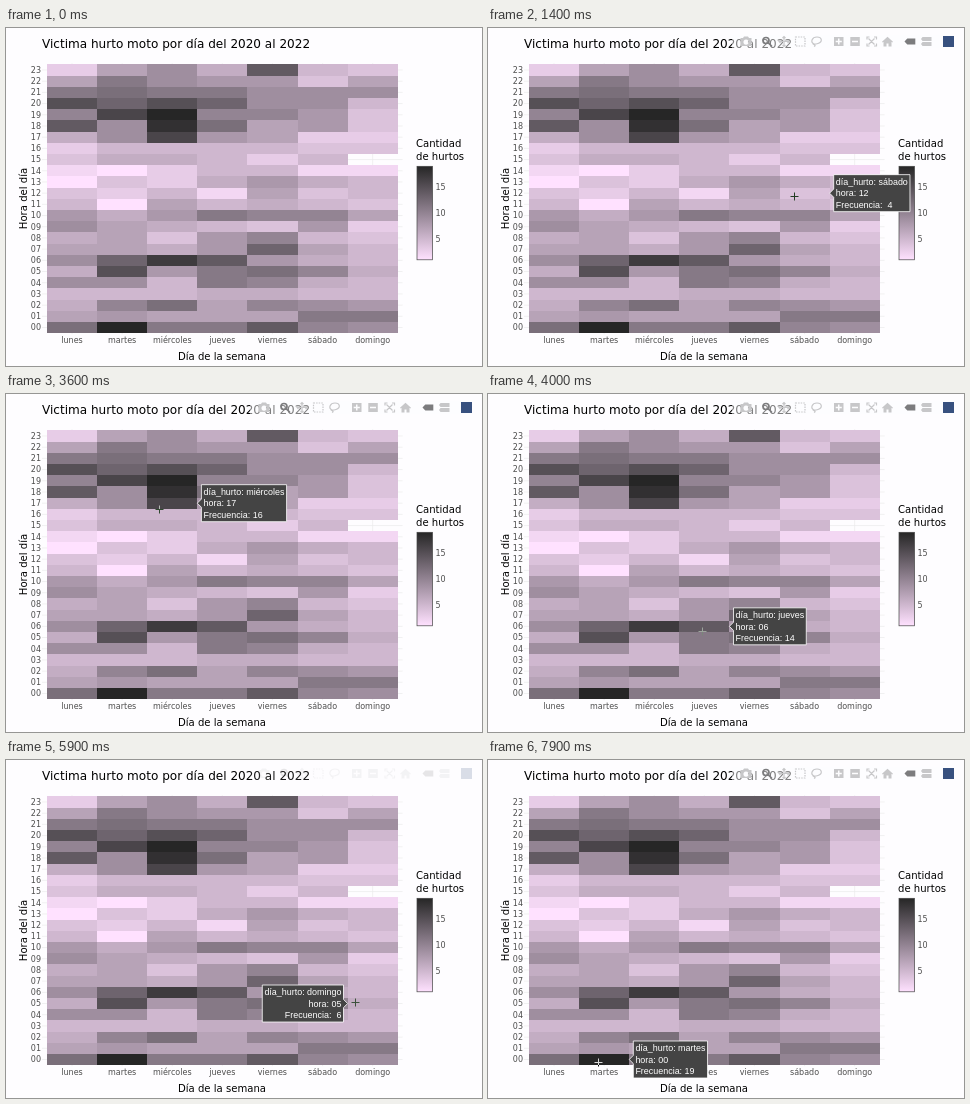
These frames come from a looping animation (476x338 px, 8 s). An HTML page:

```html
<!DOCTYPE html>
<html lang="es">
<head>
<meta charset="utf-8">
<style>
  html, body { margin: 0; width: 100%; height: 100%; overflow: hidden; background: #fefdff; }
  svg { display: block; }
  text { font-family: "DejaVu Sans", sans-serif; font-size: 10.08px; }
  .tick { font-size: 8px; fill: #4d4d4d; }
  .title { font-size: 12.05px; }
  #tip text { font-family: "Liberation Sans", Arial, sans-serif; font-size: 8.95px; fill: #fff; white-space: pre; }
  #cells { shape-rendering: crispEdges; }
  #cursor { mix-blend-mode: difference; stroke: #fff; fill: none; }
  #bar { fill: #c7c7c9; stroke: none; }
  #bar .line { fill: none; stroke: #c7c7c9; stroke-width: 1.2; }
  #bar .on { fill: #7c7c7e; }
  #bar .line.on { fill: none; stroke: #7c7c7e; stroke-width: 1.7; }
</style>
</head>
<body>
<svg width="476" height="338" viewBox="0 0 476 338">
  <defs>
    <linearGradient id="scale" x2="0" y2="1">
      <stop stop-color="#262626"/><stop offset="1" stop-color="#ffe1ff"/>
    </linearGradient>
  </defs>
  <rect width="476" height="338" fill="#fefdff"/>
  <g id="grid" stroke="#ebebeb" stroke-width=".7"></g>
  <g id="cells"></g>
  <g id="labels"></g>
  <text class="title" x="36" y="20">Victima hurto moto por día del 2020 al 2022</text>
  <text x="216" y="331.5" text-anchor="middle">Día de la semana</text>
  <text transform="translate(20.5 170.5) rotate(-90)" text-anchor="middle">Hora del día</text>
  <text x="410" y="119">Cantidad</text>
  <text x="410" y="132">de hurtos</text>
  <rect x="411" y="138.3" width="15.5" height="93.5" fill="url(#scale)" stroke="#444" stroke-width=".7"/>
  <g id="bar">
    <rect x="244" y="7" width="222" height="13.5" fill="#fefdff" fill-opacity=".5"/>
    <path fill-rule="evenodd" d="M252.500 10h2.500l1-1.500h4l1 1.500h2.500v8h-11zM258 11.500a2.600 2.600 0 1 0 .01 0z"/>
    <g class="line on"><circle cx="278" cy="12.500" r="3"/><path d="M280.300 14.800l3.700 3.700"/></g>
    <path class="line" d="M291 13.500h10M296 8.500v10M294.500 10l1.500-1.500 1.500 1.500M294.500 17l1.500 1.500 1.500-1.500M292.500 12l-1.500 1.500 1.500 1.500M299.500 12l1.500 1.500-1.500 1.500"/>
    <rect class="line" x="307.500" y="9" width="9.500" height="9" stroke-dasharray="1.500 1.100"/>
    <path class="line" d="M326 16c-4-2-2-7 3-7s6 5 1 6.500-6-.5-4 1 1 1.500 0 2"/>
    <path fill-rule="evenodd" d="M346 9h9.500v9H346zM350 10.500v2.300h-2.300v1.400H350v2.300h1.500v-2.300h2.300v-1.400h-2.300v-2.300z"/>
    <path fill-rule="evenodd" d="M362.300 9h9.500v9h-9.500zM364 12.800v1.400h6v-1.400z"/>
    <path class="line" d="M379 11.500V9h2.500M386 9h2.500v2.500M388.500 15.500V18H386M381.500 18H379v-2.500M380.500 10.500l6 6M386.500 10.500l-6 6"/>
    <path d="M394 13.800l5.500-5 5.500 5-.7.700-.8-.7v4.700h-3v-3h-2v3h-3v-4.700l-.8.700z"/>
    <path class="on" d="M416.500 13.500l2.800-3h8v6h-8z"/>
    <path d="M433 11l1.500-2h9v4h-9zM433 16l1.500-2h9v4h-9z"/>
    <rect x="455" y="8" width="11" height="11" fill="#38517f"/>
  </g>
  <g id="tip">
    <path fill="#444" stroke="#fff" stroke-width=".8"/>
    <text></text><text></text><text></text>
  </g>
  <path id="cursor" d="M-4 0H4M0-4V4"/>
</svg>
<script>
const LEFT = 41, TOP = 36.4, CELL_W = 50.1, CELL_H = 11.196, LOOP = 8000;
const days = ["lunes", "martes", "miércoles", "jueves", "viernes", "sábado", "domingo"];

// Counts from hour 23 down to 00; a gap repeats the value to its left, 0 is no data.
const counts = [
  [3, 7, 9, 6, 14, 5, 4], [7, 11, 9, 8, , 4, 7], [11, 12, 11, , 9], [15, 13, 15, 13, 9, , 5],
  [10, 16, 19, 10, , 8, 4], [14, 9, 18, 12, 7, 8, 4], [6, 9, 16, 8, 7, 3], [3, 5, , , , 4],
  [4, 6, , 5, 3, 5, 0], [2, 1, 3, 5, , 2], [1, 4, 3, 6, 8, 6, 5], [4, 3, 5, 2, 7, 4, 5],
  [5, 1, 7, 5, 6, 5, 4], [8, 6, 8, 11, 10, , 7], [9, 7, 6, 5, 4, 8, 3], [6, 7, 4, 8, 10, 5, 4],
  [7, , 6, 8, 13, 7, 5], [9, 13, 17, 14, 8, 6, 5], [6, 15, 8, 11, 12, 10, 6], [9, , 5, 11, 10, 6, 5],
  [5, , , 6, , 5], [6, 10, 12, 7, 10, 9, 8], [7, 8, 7, , , 11], [12, 19, 11, , 14, 10, 9]
].map(row => days.reduce((full, _, i) => [...full, row[i] ?? full[i - 1]], []));

// Keys are [time, ...values].
const pointer = [
  [100, 44, 196], [300, 95, 198], [600, 200, 180], [1000, 260, 149], [1300, 322, 186],
  [1500, 290, 150], [1800, 169, 89], [1900, 168.5, 89], [3500, 168.5, 89], [3700, 138, 140],
  [4000, 214, 237], [4300, 300, 240], [4400, 330, 237], [4500, 344, 235], [4900, 349, 239],
  [5000, 349, 239], [5200, 349, 242], [6600, 349, 242], [6800, 320, 255], [7100, 259, 276],
  [7500, 109, 303], [7600, 105, 304], [7700, 105, 304], [7900, 110, 302]
];
const barFade = [
  [0, 0], [400, 1], [2100, 1], [2200, .95], [2400, .3], [2600, 1],
  [5500, 1], [5600, .9], [5800, .12], [5900, .18], [6200, 1]
];

const $ = id => document.getElementById(id);
function add(parent, tag, attrs, text = "") {
  const el = document.createElementNS("http://www.w3.org/2000/svg", tag);
  for (const name in attrs) el.setAttribute(name, attrs[name]);
  el.textContent = text;
  return parent.appendChild(el);
}
const label = (text, x, y, anchor) =>
  add($("labels"), "text", { class: "tick", x, y, "text-anchor": anchor }, text);
const hourName = row => String(23 - row).padStart(2, "0");
const rowCenter = row => TOP + (row + .5) * CELL_H;

function shade(n) {
  const k = (n - 1) / 18;
  return `rgb(${[255, 225, 255].map(c => Math.round(c + (38 - c) * k))})`;
}

function sample(keys, t) {
  const i = keys.findIndex(key => key[0] > t);
  if (i < 0) return keys[keys.length - 1].slice(1);
  const a = keys[Math.max(i - 1, 0)], b = keys[i];
  const k = b === a ? 0 : (t - a[0]) / (b[0] - a[0]);
  return a.slice(1).map((v, j) => v + (b[j + 1] - v) * k);
}

counts.forEach((row, r) => {
  const y = rowCenter(r);
  add($("grid"), "path", { d: `M36 ${y}H396.600` });
  label(hourName(r), 35, y + 2.9, "end");
  row.forEach((n, c) => n && add($("cells"), "rect", {
    x: LEFT + c * CELL_W, y: TOP + r * CELL_H, width: CELL_W, height: CELL_H, fill: shade(n)
  }));
});
days.forEach((day, c) => {
  const x = LEFT + (c + .5) * CELL_W;
  add($("grid"), "path", { d: `M${x} 35.300V306.200` });
  label(day, x, 314.5, "middle");
});
[5, 10, 15].forEach(n => label(n, 429.5, 240 - n * 5.2, "start"));

const [bubble, ...lines] = $("tip").children;

function showTip(x, y) {
  const col = Math.floor((x - LEFT) / CELL_W), row = Math.floor((y - TOP) / CELL_H);
  const flip = col === 6, side = flip ? -1 : 1;
  const tipX = LEFT + (flip ? col : col + 1) * CELL_W;
  const content = [
    "día_hurto: " + days[col],
    "hora: " + hourName(row),
    "Frecuencia: " + String(counts[row][col]).padStart(2)
  ];
  lines.forEach((line, i) => {
    line.textContent = content[i];
    line.setAttribute("x", side * 6.2);
    line.setAttribute("y", 3.2 + (i - 1) * 11.65);
    line.setAttribute("text-anchor", flip ? "end" : "start");
  });
  const width = Math.max(...lines.map(line => line.getComputedTextLength())) + 4.2;
  bubble.setAttribute("d", `M0 0L${side * 4.1} 4.1V18.500h${side * width}v-37H${side * 4.1}V-4.100Z`);
  $("tip").setAttribute("transform", `translate(${tipX} ${rowCenter(row)})`);
}

function draw(now) {
  const t = Math.floor(now % LOOP / 100) * 100;
  const active = t >= 100;
  $("tip").style.display = $("cursor").style.display = active ? "" : "none";
  $("bar").style.opacity = sample(barFade, t)[0];
  if (active) {
    const [x, y] = sample(pointer, t);
    showTip(x, y);
    $("cursor").setAttribute("transform", `translate(${Math.round(x) + .5} ${Math.round(y) + .5})`);
  }
  requestAnimationFrame(draw);
}
draw(performance.now());
</script>
</body>
</html>
```
